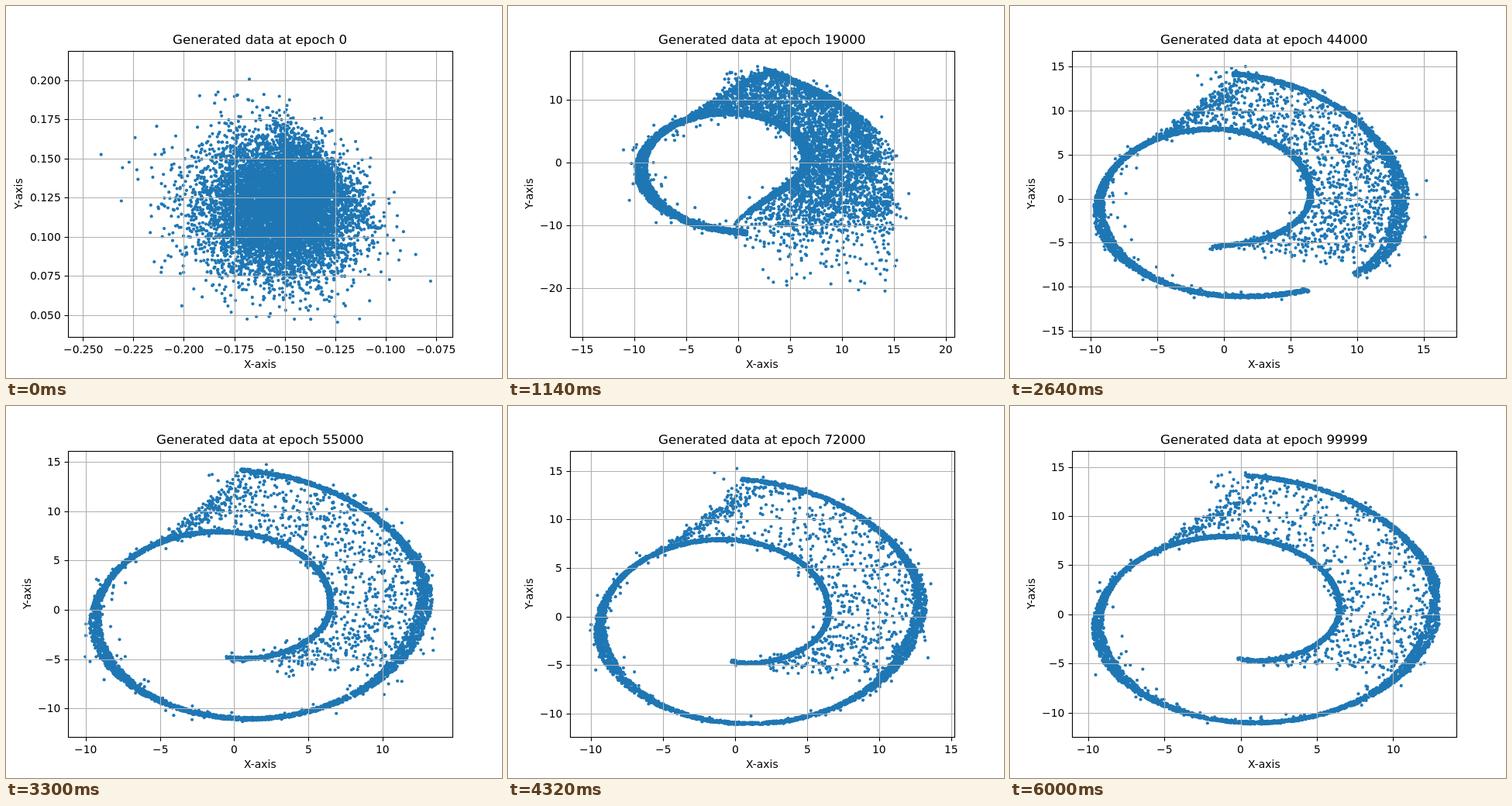
Write an HTML page with a canvas that moves like this. It is 640 px wide and 480 px high and loops after 6060 ms.

```html
<!DOCTYPE html>
<html lang="en">
<head>
<meta charset="utf-8">
<title>Generated data</title>
<style>
  html, body { margin: 0; width: 100%; height: 100%; overflow: hidden; background: #fff; }
  canvas { display: block; }
</style>
</head>
<body>
<canvas id="plot" width="640" height="480"></canvas>
<script>
const ctx = document.getElementById('plot').getContext('2d');
const STEP = 60, STEPS = 101;
const ROLL_STEP = 19; // the blob has become a rolled-up sheet by this step
const BOX = { left: 80, right: 576, top: 57.6, bottom: 427.2 };
const FONT = '"DejaVu Sans", sans-serif';

// Axis limits (x from, x to, y from, y to) at a few steps, blended in between.
const views = [
  { step: 0, lim: [-.25737, -.06698, .03582, .21904] },
  { step: 1, lim: [-14, 16, -17, 16] },
  { step: 19, lim: [-16.19, 20.82, -27.8, 17.8] },
  { step: 33, lim: [-11.6, 20.15, -18.58, 17.53] },
  { step: 55, lim: [-11.2, 14.7, -12.89, 16.12] },
  { step: 72, lim: [-11.45, 15.2, -12.41, 17.07] },
  { step: 85, lim: [-10.95, 13.82, -12.43, 16.31] },
  { step: 100, lim: [-11.07, 14.15, -12.5, 16.65] }
];

let seed = 1;
function random() {
  seed = (seed + 0x6D2B79F5) | 0;
  let t = Math.imul(seed ^ (seed >>> 15), 1 | seed);
  t = (t + Math.imul(t ^ (t >>> 7), 61 | t)) ^ t;
  return ((t ^ (t >>> 14)) >>> 0) / 4294967296;
}
const gauss = () => Math.sqrt(-2 * Math.log(1 - random())) * Math.cos(2 * Math.PI * random());
const bump = (x, centre, size) => Math.exp(-(((x - centre) / size) ** 2));
const clamp = v => Math.max(0, Math.min(1, v));
const mix = (a, b, k) => a.map((v, i) => v + (b[i] - v) * k);

function limitsAt(step) {
  const next = Math.max(1, views.findIndex(v => v.step >= step));
  const a = views[next - 1], b = views[next];
  return mix(a.lim, b.lim, (step - a.step) / (b.step - a.step));
}

// The generator settles exponentially; `rough` falls from 1 to 0.
function shapeAt(step) {
  const rough = Math.exp(-Math.max(0, step - ROLL_STEP) / 14);
  const open = clamp((52 - step) / 19);
  return {
    rough,
    start: -.1 - 2.6 * rough * (1 - rough),
    end: 23.95 - .4 * rough,
    tip: 4.7 * rough - .15,
    flare: 3.4 * open,
    gap: [17.9 - .9 * open - .8 * rough, 17.9 + .6 * open],
    fill: 600 + 2900 * rough
  };
}

// Spiral whose radius equals its angle; index counts 22.5 degree steps from straight down.
function spiral(shape, index) {
  const angle = 1.5 * Math.PI + index * Math.PI / 8;
  const radius = angle
    + shape.tip * Math.exp(-1.1 * index)
    + shape.flare * bump(index, 18.6, 1.35)
    + .2 * shape.tip * bump(index, 23.7, .6)
    + .3 * bump(index, 20.6, .8)
    + .2 * bump(index, 3.5, 1.2)
    - .12 * bump(index, 11.5, 2);
  return [radius * Math.cos(angle), radius * Math.sin(angle)];
}

function firstCloud() {
  const points = [];
  for (let n = 0; n < 10000; n++) {
    const size = Math.exp(.14 * gauss());
    let x = gauss() * size, y = gauss() * size;
    const excess = Math.max(0, x + y - 1.9);
    x -= excess * .25;
    y -= excess * .25;
    x *= x < 0 ? .019 : .0172;
    points.push([-.15 + x, .12 + y * .0215]);
  }
  return points;
}

function bandPoints(shape) {
  const points = [];
  const { rough, start, end, gap } = shape;
  for (let n = 0; n < 5600; n++) {
    const i = start + (end - start) * random() ** .8;
    const right = bump(i, 19.7, 1.4);
    if (i > gap[0] && i < gap[1] || random() < rough * right) continue;
    const p = spiral(shape, i);
    const width = .14 + .25 * rough + .28 * bump(i, 13, 1.4) + (.32 + rough) * right;
    let offset = (random() * 2 - 1) * width;
    if (random() < .05) offset = gauss() * width * 2;
    const k = 1 + offset / Math.hypot(...p);
    points.push([p[0] * k, p[1] * k]);
  }
  return points;
}

// Points that still lie between the inner and the outer turn.
function fillPoints(shape) {
  const points = [];
  const { rough, end, fill } = shape;
  const low = 1 - rough;
  for (let n = 0; n < fill; n++) {
    const s = random() ** 1.15;
    const p = mix(spiral(shape, low + (9.8 - low) * s), spiral(shape, 18.7 + (end - 18.7) * s), random());
    const drop = -Math.log(1 - random()) * (.15 + 3 * rough) * (1 - s) ** 2.5;
    const spread = .1 + (.2 + .5 * rough) * (1 - s);
    points.push([p[0] + gauss() * spread + drop * .2, p[1] + gauss() * spread - drop]);
  }
  const from = spiral(shape, 9.7);
  const to = spiral(shape, end).map(v => v * (.84 + .16 * rough));
  for (let n = 0; n < 90 + fill * .05; n++) {
    const v = random();
    const p = mix(from, to, v);
    points.push([p[0] + gauss() * (.15 + v * .35), p[1] + gauss() * (.1 + v * .3)]);
  }
  for (let n = 0; n < 30; n++) points.push([.5 + gauss() * 1.2, 13.2 + gauss() * .9]);
  return points;
}

function cloudAt(step) {
  if (step === 0) return firstCloud();
  const shape = shapeAt(step);
  const points = [...bandPoints(shape), ...fillPoints(shape)];
  if (step >= ROLL_STEP) return points;
  const k = Math.sqrt(step / ROLL_STEP);
  return points.map(p => mix([1 + gauss() * 4.2, -.5 + gauss() * 4.2], p, k));
}

function ticks(min, max) {
  const power = 10 ** Math.floor(Math.log10((max - min) / 9));
  const size = [1, 2, 2.5, 5, 10].map(m => m * power).find(s => (max - min) / s <= 9);
  const digits = size < 1 ? 3 : size % 1 ? 1 : 0;
  const list = [];
  for (let n = Math.ceil(min / size); n * size <= max; n++) {
    list.push({ value: n * size, label: (n * size).toFixed(digits).replace('-', '\u2212') });
  }
  return list;
}

function line(x1, y1, x2, y2) {
  ctx.beginPath();
  ctx.moveTo(x1, y1);
  ctx.lineTo(x2, y2);
  ctx.stroke();
}

// Writes text on whole pixels; anchor is 0.5 for centred, 1 for right-aligned.
function text(string, x, y, anchor = .5) {
  const width = ctx.measureText(string).width;
  ctx.fillText(string, Math.round(x - width * anchor), Math.round(y));
  return width;
}

function draw(step) {
  seed = 977 + step * 7919;
  const [x0, x1, y0, y1] = limitsAt(step);
  const toX = x => BOX.left + (x - x0) / (x1 - x0) * (BOX.right - BOX.left);
  const toY = y => BOX.bottom - (y - y0) / (y1 - y0) * (BOX.bottom - BOX.top);
  const snap = v => Math.round(v) + .5;

  ctx.fillStyle = '#fff';
  ctx.fillRect(0, 0, 640, 480);

  ctx.fillStyle = '#1f77b4';
  for (const [x, y] of cloudAt(step)) {
    const px = toX(x), py = toY(y);
    if (px < 102 || px > 554 || py < 73 || py > 411) continue;
    ctx.beginPath();
    ctx.arc(px, py, 2.1, 0, 2 * Math.PI);
    ctx.fill();
  }

  const xTicks = ticks(x0, x1), yTicks = ticks(y0, y1);
  ctx.lineWidth = 1.1;
  ctx.strokeStyle = '#b0b0b0';
  for (const t of xTicks) line(snap(toX(t.value)), BOX.top, snap(toX(t.value)), BOX.bottom);
  for (const t of yTicks) line(BOX.left, snap(toY(t.value)), BOX.right, snap(toY(t.value)));

  ctx.strokeStyle = ctx.fillStyle = '#000';
  ctx.strokeRect(80.5, 58.5, 496, 369);
  ctx.font = '13.89px ' + FONT;
  let labelWidth = 0;
  for (const t of xTicks) {
    const x = toX(t.value);
    line(snap(x), 428, snap(x), 432.5);
    text(t.label, x, 448);
  }
  for (const t of yTicks) {
    const y = toY(t.value);
    line(75.5, snap(y), 80, snap(y));
    labelWidth = Math.max(labelWidth, text(t.label, 70.3, y + 5, 1));
  }
  text('X-axis', 328, 467);
  ctx.save();
  ctx.translate(Math.round(61.2 - labelWidth), 242);
  ctx.rotate(-Math.PI / 2);
  text('Y-axis', 0, 0);
  ctx.restore();

  ctx.font = '16.67px ' + FONT;
  text('Generated data at epoch ' + Math.min(step * 1000, 99999), 328, 49);
}

let shown = -1;
function tick() {
  const step = Math.floor(performance.now() / STEP) % STEPS;
  if (step !== shown) draw(shown = step);
  requestAnimationFrame(tick);
}
tick();
</script>
</body>
</html>
```
